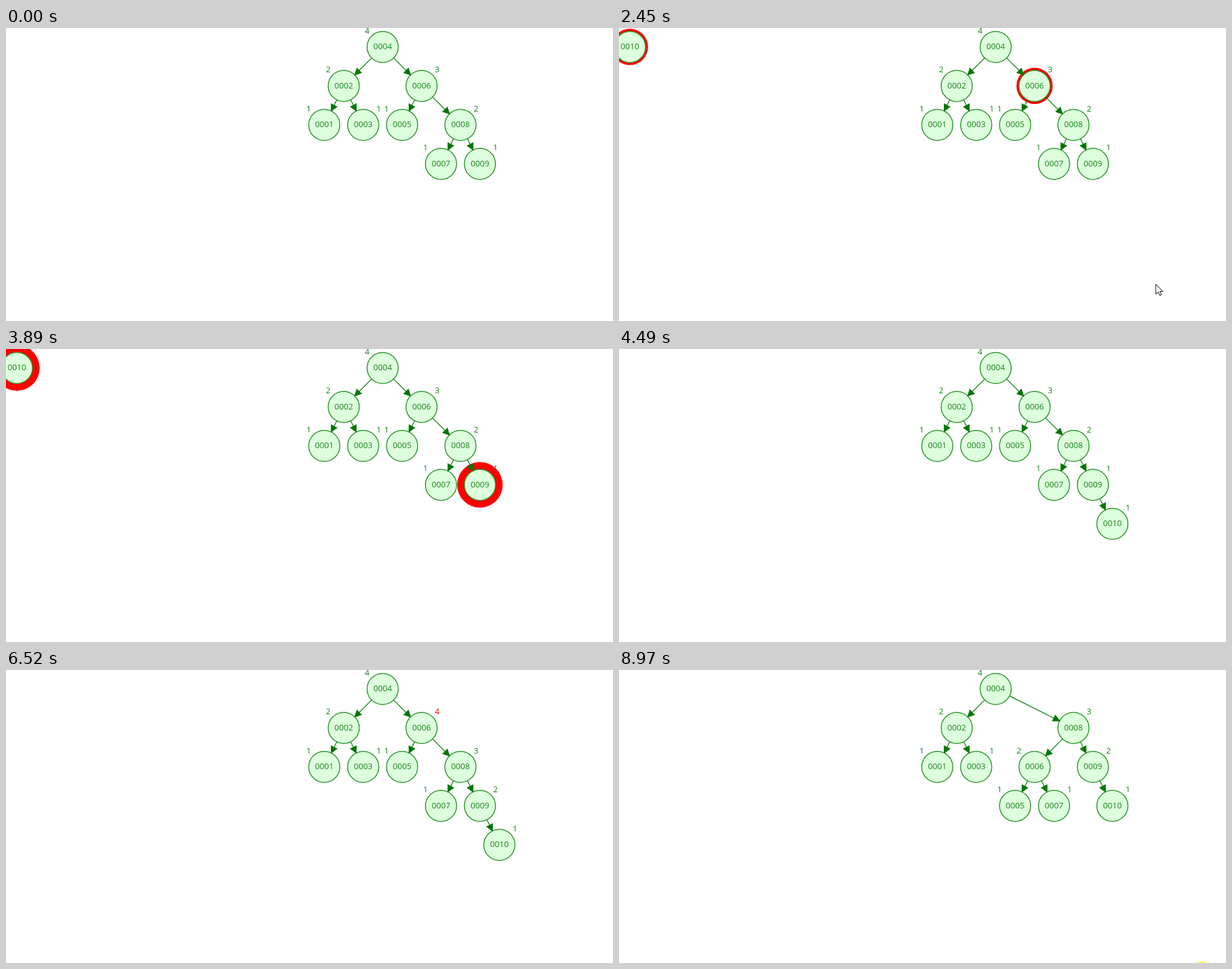
Recreate the animation shown at these times as an HTML page with a canvas. Size 975 by 470 pixels, loop 9.36 s.

```html
<!DOCTYPE html>
<html lang="en">
<head>
<meta charset="utf-8">
<title>AVL tree insertion</title>
<style>
  html, body { margin: 0; height: 100%; overflow: hidden; background: #fff; }
  canvas { display: block; }
</style>
</head>
<body>
<canvas id="stage" width="975" height="470"></canvas>
<script>
const ctx = document.getElementById('stage').getContext('2d');
const LOOP = 9360, TICK = 204;        // the picture is refreshed once per tick
const START = 1120, STEP = 374.2;     // each step of the algorithm takes this long
const R = 25, NEW_KEY = 10;
const GREEN = '#007700', OUTLINE = '#2a962a', TEXT = '#178317', RED = '#ff0000', FILL = '#ddffdd';

// Step numbers: odd steps from 1 compare, even ones descend
const INSERT = 8, ADJUST = 10, PIVOT = 15, ROTATE = 16;

// Plain binary search tree; a node's column follows from its key, its row from its depth
function buildTree(keys) {
  const tree = {};
  for (const key of keys) {
    let parent = null, next = keys[0];
    while (tree[next]) {
      parent = tree[next];
      next = key < parent.key ? parent.left : parent.right;
    }
    const side = parent && key > parent.key ? 1 : -1;
    const row = parent ? parent.row + 1 : 0;
    tree[key] = { key, parent: parent?.key, row, side, x: 605 + (key - keys[0]) * 31.25, y: 30.4 + row * 62.5 };
    if (parent) parent[side < 0 ? 'left' : 'right'] = key;
  }
  const measure = node => node ? node.height = 1 + Math.max(measure(tree[node.left]), measure(tree[node.right])) : 0;
  measure(tree[keys[0]]);
  return tree;
}

const startKeys = [4, 2, 6, 1, 3, 5, 8, 7, 9];
const initial = buildTree(startKeys);
const grown = buildTree([...startKeys, NEW_KEY]);
const rotated = buildTree([4, 2, 8, 1, 3, 6, 9, 5, 7, NEW_KEY]);

const searchPath = [];
for (let key = grown[NEW_KEY].parent; key; key = grown[key].parent) searchPath.unshift(key);

const mix = (a, b, p) => a + (b - a) * p;
const mixPlace = (a, b, p) => ({
  x: mix(a.x, b.x, p), y: mix(a.y, b.y, p), side: mix(a.side, b.side, p)
});

function circle(x, y, r, fill, stroke, width) {
  ctx.beginPath();
  ctx.arc(x, y, r, 0, 2 * Math.PI);
  if (fill) { ctx.fillStyle = fill; ctx.fill(); }
  if (stroke) { ctx.strokeStyle = stroke; ctx.lineWidth = width; ctx.stroke(); }
}

function text(value, x, y, color) {
  ctx.fillStyle = color;
  ctx.fillText(value, x, y);
}

function arrow(a, b, color, width) {
  const length = Math.hypot(b.x - a.x, b.y - a.y) - R;
  ctx.save();
  ctx.translate(a.x, a.y);
  ctx.rotate(Math.atan2(b.y - a.y, b.x - a.x));
  ctx.strokeStyle = ctx.fillStyle = color;
  ctx.lineWidth = width;
  ctx.beginPath();
  ctx.moveTo(R, 0);
  ctx.lineTo(length, 0);
  ctx.stroke();
  ctx.beginPath();
  ctx.moveTo(length, 0);
  ctx.lineTo(length - 10, -5);
  ctx.lineTo(length - 10, 5);
  ctx.closePath();
  ctx.fill();
  ctx.stroke();
  ctx.restore();
}

function pointer(x, y) {
  const shape = new Path2D('M0 0V16L4 12.5L6.5 18L9 17L6.5 11.5H11.5Z');
  ctx.save();
  ctx.translate(x + 0.5, y + 0.5);
  ctx.fillStyle = '#fff';
  ctx.fill(shape);
  ctx.strokeStyle = '#000';
  ctx.lineWidth = 1;
  ctx.stroke(shape);
  ctx.restore();
}

// The pointer shows up once, then later glides to the lower right, slowing down
function drawPointer(tick) {
  const glide = tick - 9;
  if (tick === 1) pointer(413, 134);
  else if (glide >= 0 && glide < 5) pointer(1025 - 859 * 0.575 ** glide, 442 - 370 * 0.44 ** glide);
}

// Highlight width: a slow triangle wave
function pulse(time) {
  const period = 4360, phase = (time - 2510 + 2 * period) % period;
  return 3.75 + Math.min(phase, period - phase) / 174;
}

function draw(time, tick) {
  const progress = (time - START) / STEP;
  const step = Math.floor(progress);
  const during = n => Math.max(0, Math.min(1, progress - n));
  const tree = step >= ROTATE ? rotated : grown;

  const places = {};
  for (const key in grown) places[key] = mixPlace(grown[key], rotated[key], during(ROTATE));
  places[NEW_KEY] = mixPlace({ x: 17.5, y: 30.4, side: -1 }, places[NEW_KEY], during(INSERT));

  // heights are corrected from the new leaf upwards, every second step
  const adjustStep = key => ADJUST + 2 * (searchPath.length - 1 - searchPath.indexOf(key));
  const heightOf = key => {
    const corrected = searchPath.indexOf(key) > 0 && step >= adjustStep(key);
    return (corrected || key === NEW_KEY ? tree : initial)[key].height;
  };

  const keys = Object.keys(grown).map(Number).filter(key => key !== NEW_KEY || step >= 0);
  const linked = keys.filter(key => key !== NEW_KEY || step >= INSERT);
  const searching = step > 0 && step < INSERT;
  const level = Math.floor((step - 1) / 2);

  ctx.fillStyle = '#fff';
  ctx.fillRect(0, 0, 975, 470);
  ctx.font = '13.2px "Open Sans", "Noto Sans", sans-serif';
  ctx.textAlign = 'center';

  if (searching && step % 2) {
    for (const key of [searchPath[level], NEW_KEY]) circle(places[key].x, places[key].y, R + pulse(time), RED);
  }
  for (const key of keys) {
    const { x, y } = places[key];
    circle(x, y, R, FILL, OUTLINE, 1.5);
    text(String(key).padStart(4, '0'), x, y + 4, TEXT);
  }

  if (step === PIVOT) arrow(places[6], places[8], RED, pulse(time));
  for (const key of linked) {
    const { parent } = tree[key];
    if (parent) arrow(places[parent], places[key], GREEN, 1.25);
  }

  for (const key of linked) {
    const { x, y, side } = places[key];
    const adjusting = searchPath.indexOf(key) > 0 && step === adjustStep(key);
    text(heightOf(key), x + side * R, y - R + 3.4, adjusting ? RED : TEXT);
  }

  // ring travelling to the next node on the search path
  if (searching && step % 2 === 0) {
    const ring = mixPlace(places[searchPath[level]], places[searchPath[level + 1]], during(step));
    circle(ring.x, ring.y, R, null, GREEN, 5);
  }

  drawPointer(tick);
  if (tick >= 44) circle(936, 482, 15, '#ffff66');
}

function frame(now) {
  const tick = Math.floor((now % LOOP + 16) / TICK);
  draw(tick * TICK, tick);
  requestAnimationFrame(frame);
}
requestAnimationFrame(frame);
</script>
</body>
</html>
```
